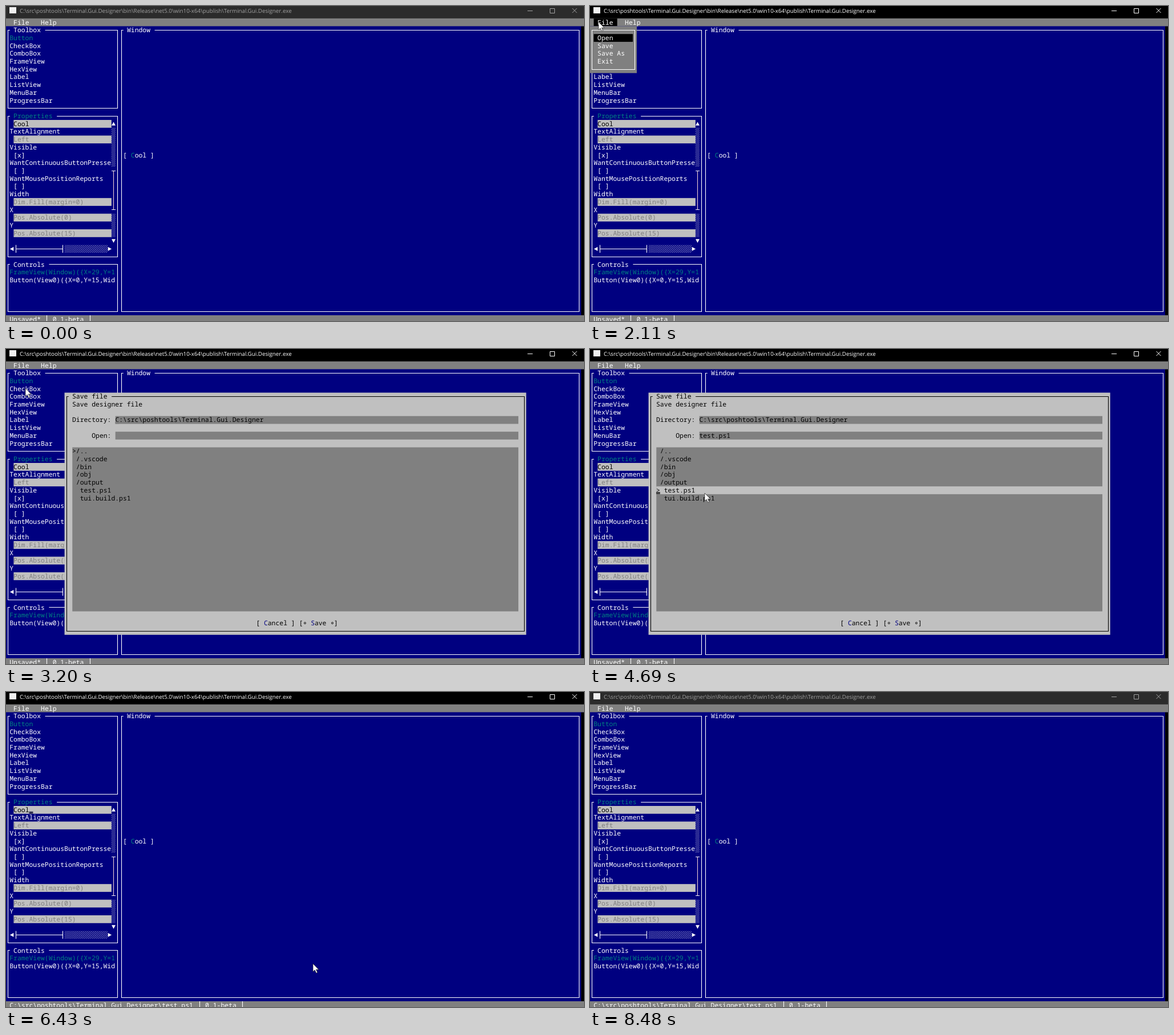
Write an HTML page that moves like this. It is 1013 by 553 pixels and loops after 8.56 s.

```html
<!DOCTYPE html>
<html lang="en">
<head>
<meta charset="utf-8">
<title>Terminal designer</title>
<style>
  html, body { margin: 0; width: 100%; height: 100%; overflow: hidden; background: #000080; }
  svg { display: block; width: 1013px; height: 553px; }
  text { white-space: pre; text-rendering: geometricPrecision; font: 11.428px "Noto Sans Mono", "DejaVu Sans Mono", monospace; }
  .caption { font: 9.77px "Open Sans", "Noto Sans", sans-serif; }
</style>
</head>
<body>
<svg id="stage" viewBox="0 0 1013 553" xmlns="http://www.w3.org/2000/svg"></svg>
<script>
const LOOP = 8560, CW = 6.857, CH = 13.714;
const BLUE = '#000080', TEAL = '#008080', GREY = '#808080', SILVER = '#c0c0c0', WHITE = '#fff', BLACK = '#000';
const path = String.raw`C:\src\poshtools\Terminal.Gui.Designer`;

// Character grid helpers
const X = col => col * CW;
const Y = row => 21.75 + row * CH;
const midX = col => Math.floor(X(col + 0.5)) + 0.5;
const midY = row => Math.floor(Y(row + 0.5) + 0.15) + 0.5;

const rect = (x, y, w, h, fill, extra = '') =>
  `<rect x="${x}" y="${y}" width="${w}" height="${h}" fill="${fill}" ${extra}/>`;
const cells = (col, row, cols, rows, fill) => rect(X(col) - 0.3, Y(row), cols * CW, rows * CH, fill);
const text = (col, row, str, fill = WHITE) =>
  `<text x="${X(col) - 0.6}" y="${Y(row) + 10.75}" fill="${fill}">${str}</text>`;
const line = (d, color = WHITE, width = 1.1) =>
  `<path d="${d}" fill="none" stroke="${color}" stroke-width="${width}"/>`;
const shape = (d, fill = WHITE) => `<path d="${d}" fill="${fill}"/>`;
const group = (id, body) => `<g id="${id}">${body}</g>`;
const caret = (id, col, row, fill) =>
  group(id, rect(X(col) - 0.6, Y(row + 1) - 3.9, CW, 3.8, fill));

function frame(c1, r1, c2, r2, title, color = WHITE, titleColor = color) {
  const l = midX(c1), r = midX(c2), t = midY(r1), b = midY(r2);
  const d = `M${X(c1 + 1)} ${t}H${l}V${b}H${r}V${t}H${X(c1 + 3 + title.length)}`;
  return line(d, color) + text(c1 + 2, r1, title, titleColor);
}

function titleBar(id, bg, fg) {
  return group(id, rect(0, 0, 1013, 22, bg) + rect(6, 2, 12, 11, '#f0f0f0') +
    `<text class="caption" x="24" y="12" fill="${fg}">${path}${String.raw`\bin\Release\net5.0\win10-x64\publish\Terminal.Gui.Designer.exe`}</text>` +
    line('M914 8.5h9M953.5 4.5h8v8h-8zM992.5 4l8 8M1000.5 4l-8 8', fg, 1));
}

function toolbox() {
  const items = ['Button', 'CheckBox', 'ComboBox', 'FrameView', 'HexView', 'Label', 'ListView', 'MenuBar', 'ProgressBar'];
  return frame(0, 1, 28, 11, 'Toolbox') +
    items.map((s, i) => text(1, 2 + i, s, i ? WHITE : TEAL)).join('');
}

function scrollbars() {
  const x = midX(27), y = midY(29), shade = 'url(#shade)';
  const top = midY(19), end = midY(24), left = midX(2), right = midX(14);
  return shape(`M${x - 3.4} ${Y(13) + 9.8}h6.8l-3.4 -6.4z`) +
    shape(`M${x - 3.4} ${Y(28) + 3.6}h6.8l-3.4 6.4z`) +
    cells(27, 14, 1, 5, shade) + cells(27, 25, 1, 3, shade) +
    line(`M${x} ${top}V${end}`, '#ecccd2') +
    line(`M${X(27)} ${top}h${CW}M${X(27)} ${end}h${CW}`) +
    shape(`M${X(2) - 0.4} ${y - 3.4}v6.8l-6.4 -3.4z`) +
    shape(`M${X(26) + 0.4} ${y - 3.4}v6.8l6.4 -3.4z`) +
    line(`M${left} ${y}H${right}M${left} ${Y(29)}v${CH}M${right} ${Y(29)}v${CH}`) +
    cells(15, 29, 11, 1, shade);
}

function properties() {
  const labels = { 14: 'TextAlignment', 16: 'Visible', 18: 'WantContinuousButtonPresse',
    20: 'WantMousePositionReports', 22: 'Width', 24: 'X', 26: 'Y' };
  const fields = { 13: 'Cool', 15: 'Left', 23: 'Dim.Fill(margin=0)', 25: 'Pos.Absolute(0)', 27: 'Pos.Absolute(15)' };
  const checks = { 17: '[x]', 19: '[ ]', 21: '[ ]' };
  const rows = (set, draw) => Object.entries(set).map(([r, s]) => draw(+r, s)).join('');
  return frame(0, 12, 28, 30, 'Properties', WHITE, TEAL) +
    rows(labels, (r, s) => text(1, r, s)) +
    rows(checks, (r, s) => text(2, r, s)) +
    rows(fields, (r, s) => cells(2, r, 25, 1, SILVER) + text(2, r, s, r === 13 ? BLACK : GREY)) +
    scrollbars();
}

function controls() {
  return frame(0, 31, 28, 37, 'Controls') +
    text(1, 32, 'FrameView(Window)({X=29,Y=1', TEAL) +
    text(1, 33, 'Button(View0)({X=0,Y=15,Wid');
}

function status(id, label) {
  const col = label.length + 2, bar = c => `M${midX(c)} ${Y(38)}v${CH}`;
  return group(id, text(1, 38, label) + text(col + 2, 38, '0.1-beta') + line(bar(col) + bar(col + 11)));
}

function menu() {
  const items = ['Open', 'Save', 'Save As', 'Exit'];
  const l = midX(0), r = midX(11), t = midY(1), b = midY(6);
  return group('menu', cells(1, 0, 6, 1, BLACK) + text(2, 0, 'File') +
    cells(0, 1, 12, 6, GREY) + line(`M${l} ${t}H${r}V${b}H${l}z`) +
    group('pick', cells(1, 2, 10, 1, BLACK)) +
    items.map((s, i) => text(2, 2 + i, s)).join(''));
}

function dialog() {
  const files = ['/..', '/.vscode', '/bin', '/obj', '/output', ' test.ps1', ' tui.build.ps1'];
  const ring = col => `<circle cx="${X(col + 0.5) - 0.6}" cy="${Y(33.5)}" r="1.5" fill="none" stroke="#000" stroke-width=".9"/>`;
  return group('dialog', cells(15, 4, 118, 31, SILVER) +
    frame(15, 4, 132, 34, 'Save file', BLACK) +
    text(17, 5, 'Save designer file', BLACK) +
    text(17, 7, 'Directory:', BLACK) + cells(28, 7, 103, 1, GREY) + text(28, 7, path, BLACK) +
    text(22, 9, 'Open:', BLACK) + cells(28, 9, 103, 1, GREY) +
    cells(17, 11, 114, 21, GREY) +
    group('unchosen', text(17, 11, '>', BLACK) + caret('dirCaret', 28, 7, '#7f7f7f')) +
    group('chosen', cells(17, 16, 114, 1, SILVER) + text(17, 16, '>', BLACK) +
      text(28, 9, 'test.ps1', BLACK) + caret('listCaret', 17, 16, '#3f3f3f')) +
    files.map((s, i) => text(18, 11 + i, s, BLACK)).join('') +
    text(64, 33, '[  ancel ] [   ave  ]', BLACK) +
    text(66, 33, 'C', BLUE) + text(78, 33, 'S', BLUE) + ring(76) + ring(83));
}

const stage = document.getElementById('stage');
stage.innerHTML = `<defs><pattern id="shade" width="3.43" height="3.43" patternUnits="userSpaceOnUse">
  <path d="M0 0h1.2v1.2h-1.2zM1.7 1.7h1.2v1.2h-1.2z" fill="#a0a0cc"/></pattern></defs>` +
  rect(0, 0, 1013, 553, BLUE) + rect(X(147), Y(1), 9, 37 * CH, BLACK) +
  titleBar('idleTitle', '#2b2b2b', '#a2a2a2') + titleBar('liveTitle', BLACK, WHITE) +
  rect(0, Y(0), 1013, CH, GREY) + text(2, 0, 'File') + text(9, 0, 'Help') +
  toolbox() + properties() + controls() +
  frame(29, 1, 146, 37, 'Window') + text(30, 17, '[  ool ]') + text(32, 17, 'C', TEAL) +
  rect(0, Y(38), 1013, CH, GREY) + status('unsaved', 'Unsaved*') + status('saved', path + '\\test.ps1') +
  caret('fieldCaret', 6, 13, '#2f2f4f') + caret('strayCaret', 27, 4, '#ffffdc') +
  menu() + dialog() +
  group('mouse', '<path d="M0 0V14L3.2 11.1L5.7 16.4L7.9 15.4L5.5 10.2H10Z" fill="#fff" stroke="#202020" stroke-width=".7"/>');

const el = id => document.getElementById(id);
const show = (id, on) => el(id).setAttribute('display', on ? 'inline' : 'none');
const within = (t, a, b) => t >= a && t < b;

// Pointer moves: start, end, number of steps, way points
const moves = [
  [210, 850, 9, [868, 529], [560, 360], [180, 165], [3, 78], [-20, 60]],
  [1080, 1400, 5, [0, 31], [8, 29], [15, 28]],
  [2410, 2810, 6, [17, 33], [27, 55], [34, 69]],
  [3520, 4360, 12, [40, 75], [205, 210], [290, 270], [356, 360], [240, 283], [215, 260]],
  [4450, 4690, 4, [207, 256], [201, 253]],
  [4840, 4841, 2, [201, 251], [201, 251]],
  [5160, 5960, 11, [206, 254], [340, 350], [480, 445], [534, 474]],
  [6040, 6110, 2, [536, 476], [538, 477]],
  [6810, 7040, 4, [538, 480], [535, 493], [530, 504]],
  [7230, 7310, 2, [525, 535], [520, 570]]
];

function pointer(t) {
  const move = moves.filter(m => t >= m[0]).pop();
  if (!move || within(t, 850, 1080) || t >= 7310) return null;
  const [start, end, steps, ...pts] = move;
  const n = steps - 1;
  const k = Math.min(n, Math.floor((t - start) / (end - start) * n + 1e-6)) / n * (pts.length - 1);
  const i = Math.min(pts.length - 2, Math.floor(k));
  return pts[i].map((v, j) => v + (pts[i + 1][j] - v) * (k - i));
}

function draw(t) {
  const live = within(t, 1550, 8480);
  show('liveTitle', live);
  show('idleTitle', !live);
  show('fieldCaret', within(t, 1550, 2040) || within(t, 6360, 6810) || within(t, 7310, 7860) || within(t, 8410, 8480));
  show('strayCaret', within(t, 3120, 3200));
  show('menu', within(t, 2110, 3040));
  show('dialog', within(t, 3200, 6360));
  show('chosen', t >= 4530);
  show('unchosen', t < 4530);
  show('saved', t >= 6360);
  show('unsaved', t < 6360);

  const p = pointer(t);
  show('mouse', p);
  if (p) el('mouse').setAttribute('transform', `translate(${p[0]} ${p[1]})`);
  el('pick').setAttribute('transform', `translate(0 ${p && p[1] > Y(3) ? CH : 0})`);
}

const began = performance.now();
function tick() {
  draw((performance.now() - began) % LOOP);
  requestAnimationFrame(tick);
}
tick();
</script>
</body>
</html>
```
